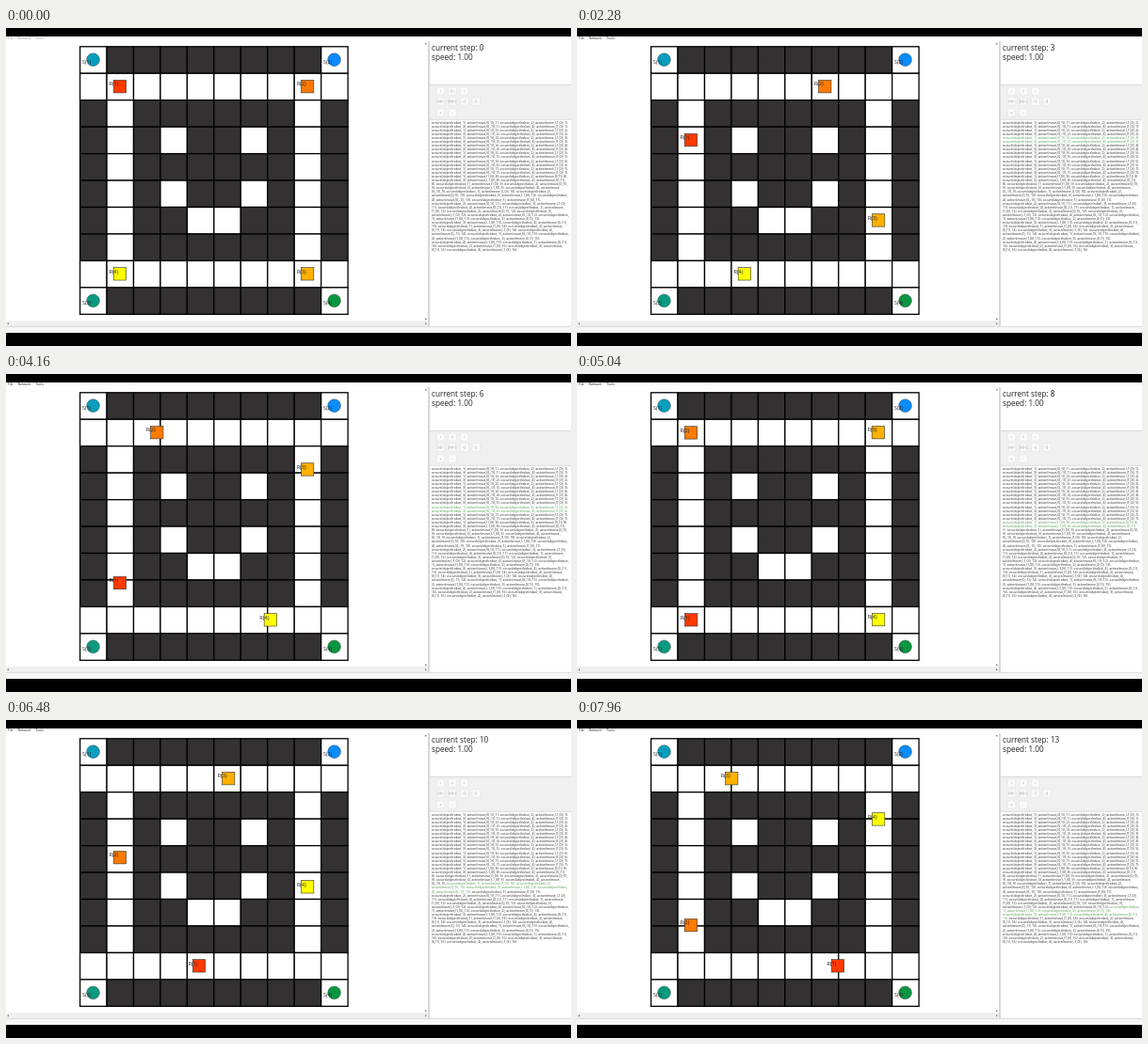
Animation, 600 px wide and 338 px high, one loop 8000 ms. Source, as an HTML page:

```html
<!DOCTYPE html>
<html lang="en">
<head>
<meta charset="utf-8">
<title>Robot grid</title>
<style>
  html, body { margin: 0; width: 100%; height: 100%; overflow: hidden; background: #000; }
  svg { display: block; width: 100vw; height: 100vh; }
  text { font-family: "Open Sans", "Noto Sans", sans-serif; white-space: pre; }
</style>
</head>
<body>
<svg id="stage" viewBox="0 0 600 338"></svg>
<script>
const stage = document.getElementById('stage');
const LOOP = 8000, LABEL_START = 1080, MOVE_START = 1188, PERIOD = 550, MOVE = 360;
const LEFT = 78.6, TOP = 19.8, CELL = 28.45, SIDE = 7, LINE_CHARS = 98;
const DARK = '#343133', INK = '#2a2a2a';

function add(tag, attrs, parent = stage, content = '') {
  const node = document.createElementNS('http://www.w3.org/2000/svg', tag);
  for (const key in attrs) node.setAttribute(key, attrs[key]);
  node.textContent = content;
  parent.appendChild(node);
  return node;
}
const rect = (x, y, width, height, fill, extra = {}, parent) =>
  add('rect', { x, y, width, height, fill, ...extra }, parent);
const label = (x, y, size, content, fill = '#222', extra = {}, parent) =>
  add('text', { x, y, 'font-size': size, fill, ...extra }, parent, content);
const line = (d, stroke, width) =>
  add('path', { d, stroke, 'stroke-width': width, fill: 'none' });

// Anticlockwise ring: down, right, up, left.
const HEADINGS = [[0, 1], [1, 0], [0, -1], [-1, 0]];
function ringPoint(distance) {
  const d = distance % (4 * SIDE), along = d % SIDE;
  return [[1, 1 + along], [1 + along, 8], [8, 8 - along], [8 - along, 1]][Math.floor(d / SIDE)];
}
const heading = distance => HEADINGS[Math.floor(distance / SIDE) % 4];

function drawWindow() {
  rect(0, 9, 600, 315, '#fff');
  rect(0, 311, 448, 6, '#f0f0f0');
  rect(448, 14, 2, 303, '#d8d8d8');
  rect(450, 60, 150, 37, '#f0f0f0');
  rect(0, 317, 600, 7, '#f6f6f6');
  line('M0 317.3H600M450 60.3H600M450 97.3H600', '#c4c4c4', 0.6);
  const arrow = (x, y, turn) =>
    add('path', { d: 'M-1.2 .7L0 -.7L1.2 .7Z', fill: '#555', transform: `translate(${x} ${y}) rotate(${turn})` });
  arrow(445.8, 16.5, 0);
  arrow(445.8, 309.5, 180);
  arrow(2, 314.3, -90);
  arrow(446, 314.3, 90);
}

function drawGrid() {
  const rows = ['.########.', '..........', '#.######.#', '#.#.##.#.#', '#.######.#',
                '#.#.##.#.#', '#.##..##.#', '#.######.#', '..........', '.########.'];
  rows.forEach((row, y) => [...row].forEach((mark, x) =>
    rect(LEFT + x * CELL, TOP + y * CELL, CELL, CELL, mark === '#' ? DARK : '#fff',
      { stroke: '#000', 'stroke-width': 1.3 })));
}

function drawStations() {
  const stations = [[0, 0, '#0a9dbd'], [9, 0, '#0a8cff'], [0, 9, '#0a9a80'], [9, 9, '#0a9540']];
  stations.forEach(([x, y, fill], i) => {
    const cx = LEFT + (x + 0.5) * CELL - 0.3, cy = TOP + (y + 0.5) * CELL - 0.3;
    add('circle', { cx, cy, r: 6.9, fill, stroke: '#333', 'stroke-width': 0.4 });
    label(cx - 11.5, cy + 4.2, 5.3, `S(${i + 1})`);
  });
}

function drawRobots() {
  return [['#ff3a00', 0], ['#ff7a00', 21], ['#ffb000', 14], ['#ffff00', 7]].map(([fill, offset], i) => {
    const node = add('g', {});
    rect(-6.7, -6.7, 13.4, 13.4, fill, { stroke: '#333', 'stroke-width': 0.6 }, node);
    label(-11.5, -0.7, 5.6, `R(${i + 1})`, '#222', {}, node);
    return { node, offset };
  });
}

function drawButtons() {
  const button = (x, y, glyph) => {
    rect(x - 4.3, y - 4.2, 8.6, 8.4, '#fafafa', { rx: 1, stroke: '#dcdcdc', 'stroke-width': 0.5 });
    return label(x, y + 1.4, 4, glyph, '#666', { 'text-anchor': 'middle' });
  };
  button(461.5, 67, '‹');
  const play = button(474, 67, '▷');
  button(486.7, 67, '›');
  ['▷▷', '▷▷|', '‹|', '›|'].forEach((glyph, i) => button(461.5 + i * 12.6, 78, glyph));
  button(461.5, 90, '+');
  button(474, 90, '-');
  return play;
}

// Wraps the plan at spaces and before coordinates; keeps spans per step for highlighting.
function drawPlan(robots) {
  const spans = [], lines = [[]];
  let length = 0;
  for (let step = 1; step <= 16; step++) {
    robots.forEach(({ offset }, i) => {
      const move = heading(offset + step - 1).join(',');
      const fact = `occurs(object(robot, ${i + 1}), action(move,(${move})), ${step}). `;
      for (const piece of fact.split(/(?<= )|(?<=move,)/)) {
        if (length + piece.trimEnd().length > LINE_CHARS) { lines.push([]); length = 0; }
        lines[lines.length - 1].push({ piece, step });
        length += piece.length;
      }
    });
  }
  lines.forEach((pieces, row) => {
    const text = label(452, 101.5 + row * 4.1, 3.45, '', INK);
    for (let i = 0; i < pieces.length;) {
      const step = pieces[i].step;
      let part = '';
      while (i < pieces.length && pieces[i].step === step) part += pieces[i++].piece;
      (spans[step] ||= []).push(add('tspan', {}, text, part));
    }
  });
  return spans;
}

drawWindow();
const menu = [[2, 'File'], [12.5, 'Network'], [31.5, 'Tools']].map(([x, name]) => label(x, 12, 3.5, name));
drawGrid();
drawStations();
const robots = drawRobots();
const stepLabel = label(452, 24, 8.2, '', '#222');
label(452, 34.3, 8.2, 'speed: 1.00', '#222');
const play = drawButtons();
const plan = drawPlan(robots);

function progress(time) {
  const elapsed = Math.max(0, time - MOVE_START);
  return Math.floor(elapsed / PERIOD) + Math.min(1, elapsed % PERIOD / MOVE);
}

function render(time) {
  const step = Math.max(0, Math.floor((time - LABEL_START) / PERIOD) + 1);
  const distance = progress(time);
  robots.forEach(({ node, offset }) => {
    const [x, y] = ringPoint(offset + distance);
    node.setAttribute('transform',
      `translate(${LEFT + (x + 0.5) * CELL - 0.3} ${TOP + (y + 0.5) * CELL - 0.3})`);
  });
  stepLabel.textContent = `current step: ${step}`;
  play.textContent = step ? '॥' : '▷';
  menu.forEach(item => item.setAttribute('opacity', Math.min(1, 0.45 + time / 1300)));
  plan.forEach((parts, i) => parts.forEach(span =>
    span.setAttribute('fill', i === step ? '#4a964a' : INK)));
}

const start = performance.now();
function tick() {
  render((performance.now() - start) % LOOP);
  requestAnimationFrame(tick);
}
render(0);
requestAnimationFrame(tick);
</script>
</body>
</html>
```
